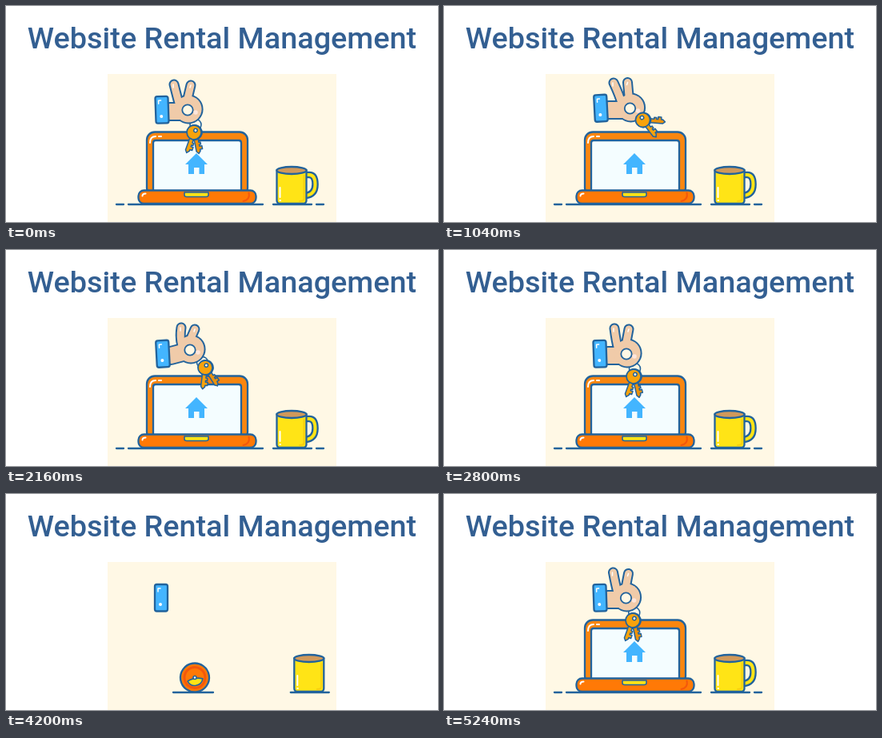
An HTML page that plays this animation: 540 px wide and 270 px high, repeating every 5.28 s.

```html
<!DOCTYPE html>
<html lang="en">
<head>
<meta charset="utf-8">
<title>Website Rental Management</title>
<style>
html, body { margin: 0; width: 100%; height: 100%; overflow: hidden; background: #fff; }
svg { display: block; width: 540px; height: 270px; }
text { font: 500 37.8px Roboto, "Open Sans", sans-serif; fill: #335f92; }
#scene { stroke: #22639c; stroke-width: 2.3; stroke-linecap: round; stroke-linejoin: round; fill: none; }
</style>
</head>
<body>
<svg viewBox="0 0 540 270">
  <defs>
    <clipPath id="panel"><rect x="127" y="85" width="286" height="185"/></clipPath>
    <filter id="rough" filterUnits="userSpaceOnUse" x="127" y="85" width="286" height="185" color-interpolation-filters="sRGB">
      <feTurbulence id="noise" type="fractalNoise" baseFrequency=".09" numOctaves="1" result="n"/>
      <feDisplacementMap in="SourceGraphic" in2="n" scale="1.4" xChannelSelector="R" yChannelSelector="G"/>
    </filter>
  </defs>
  <text x="270" y="53" text-anchor="middle">Website Rental Management</text>
  <rect x="127" y="85" width="286" height="185" fill="#fff8e5"/>
  <g clip-path="url(#panel)"><g filter="url(#rough)"><g id="scene"></g></g></g>
</svg>
<script>
const LOOP = 5280, STEP = 40, EXIT = 2800, ENTER = 3380;
const ORANGE = '#ff7906', AMBER = '#f9860f', YELLOW = '#ffe416', SKIN = '#f0cba9', BLUE = '#43b5ff', PAPER = '#fff8e5';
const scene = document.getElementById('scene'), noise = document.getElementById('noise');

const clamp = v => Math.min(1, Math.max(0, v));
const span = (t, a, b) => clamp((t - a) / (b - a));
const mix = (a, b, u) => a + (b - a) * u;
const smooth = u => u * u * (3 - 2 * u);
const easeOut = (u, p = 2) => 1 - (1 - u) ** p;
const back = u => 1 + 2.2 * (u - 1) ** 3 + 1.2 * (u - 1) ** 2;

// time, cuff x y tilt, two finger tips, thumb loop, key head, two blade angles
const POSES = [
  [0, 195, 130, -2, 210, 98, 231, 99, 227, 130, 235, 158, 20, -11],
  [600, 195, 130, -2, 220, 97, 238, 100, 231, 130, 238, 159, 18, -40],
  [1480, 197, 126, -4, 204, 95, 221, 91, 234, 126, 259, 126, -94, -130],
  [2160, 196, 130, -3, 219, 97, 236, 99, 230, 125, 249, 147, 7, -32],
  [2800, 195, 130, -2, 213, 98, 231, 99, 228, 130, 237, 158, 20, -13],
  [5200, 195, 130, -2, 213, 98, 230, 100, 228, 130, 237, 158, 20, -13],
  [5280, 195, 130, -2, 210, 98, 231, 99, 227, 130, 235, 158, 20, -11]
];

function poseAt(t) {
  const i = POSES.findIndex(p => p[0] > t), a = POSES[i - 1], b = POSES[i];
  const u = smooth(span(t, a[0], b[0]));
  return a.map((v, k) => mix(v, b[k], u)).slice(1);
}

const path = (d, attrs = '') => `<path d="${d}" ${attrs}/>`;
const fill = c => `fill="${c}"`;
const flat = c => `fill="${c}" stroke="none"`;
const shine = (d, w = 2) => path(d, `stroke="#fff" stroke-width="${w}"`);
const box = (x, y, w, h, r, attrs) => `<rect x="${x}" y="${y}" width="${w}" height="${h}" rx="${r}" ${attrs}/>`;
const circle = (x, y, r, attrs) => `<circle cx="${x}" cy="${y}" r="${r}" ${attrs}/>`;
const group = (transform, body) => `<g transform="${transform}">${body}</g>`;
const scaled = (x, y, sx, sy, body) =>
  sx > 0 && sy > 0 ? group(`translate(${x} ${y}) scale(${sx} ${sy}) translate(${-x} ${-y})`, body) : '';

const ground = (a, b) => b - a > 1 ? path(`M${a} 248H${b}`) : '';

function laptopLid() {
  return box(176, 157.5, 126, 80, 10, fill(AMBER)) +
    path('M184 232V171Q184 168 187 168H291Q294 168 294 171V232Z', fill('#f4fdff')) +
    shine('M180 171Q180 163 187 163M191 163H194');
}

function laptopBase(u) {
  const half = mix(18, 73.5, u), top = mix(212, 230.5, u), h = 247 - top, r = mix(18, 7, clamp(u));
  const pad = mix(8, 15, u);
  return box(239 - half, top, half * 2, h, r, fill(ORANGE)) +
    path(`M${239 + half - 9} ${top + 3}Q${239 + half - 7} ${top + h - 5} ${239 + half - 16} ${top + h - 3}`,
      'stroke="#f4580c" stroke-width="2"') +
    path(`M${238 - pad} ${top + 2.5}H${238 + pad}V${top + 6}Q${238 + pad} ${top + 8} ${235 + pad} ${top + 8}H${241 - pad}Q${238 - pad} ${top + 8} ${238 - pad} ${top + 6}Z`,
      fill(YELLOW) + ' stroke-width="1.6"') +
    shine(`M${239 - half + 5} ${top + 7}Q${239 - half + 5} ${top + 4} ${239 - half + 9} ${top + 4}`);
}

function ball(x) {
  const turn = (x - 239) / 18 * 180 / Math.PI;
  return group(`translate(${x} 229.5) rotate(${turn})`,
    circle(0, 0, 18, fill(ORANGE)) +
    circle(0, 0, 13, 'stroke="#f4580c" stroke-width="3"') +
    path('M-9.5 3Q0 -1 9.5 3A10 10 0 0 1 -9.5 3Z', fill(YELLOW) + ' stroke-width="1.6"') +
    circle(0, 0, 2, fill('#fff') + ' stroke-width="1.6"'));
}

const house = () => path('M238 184L252 198H248V210H241.5V202H235V210H228V198H224Z', flat(BLUE));

function mug(handle) {
  const ring = 'M374 211H379Q386.5 211 386.5 223Q386.5 236 374 237';
  const grip = path(ring, 'stroke-width="8.6"') + path(ring, `stroke="${YELLOW}" stroke-width="4"`);
  return scaled(374, 224, handle, handle, grip) +
    path('M338.5 205V243Q338.5 247 343 247H371Q375.5 247 375.5 243V205Z', fill(YELLOW)) +
    path('M372.5 212V241Q372 244 367 244', 'stroke="#f8cf0f" stroke-width="2"') +
    `<ellipse cx="357" cy="205.5" rx="18.5" ry="4.5" fill="#d1995a"/>` +
    shine('M342.5 227V239M342.5 243H343');
}

function cuff(x, y, tilt) {
  return group(`translate(${x} ${y}) rotate(${tilt})`,
    box(-8, -17, 16, 33.5, 2.5, fill(BLUE)) +
    shine('M-4 -8V-12H-1', 1.5) + circle(-1, 8, 2, flat('#fff')));
}

function hand([cx, cy, , ax, ay, bx, by, hx, hy]) {
  const px = hx + 1, py = hy - 1;
  const limbs = [
    [`M${cx + 10} ${cy + 2}L${px - 6} ${py + 3}`, 20],
    [`M${px} ${py}h.1`, 33],
    [`M${px - 11} ${py - 4}Q${px - 14} ${py - 15} ${ax} ${ay}`, 9],
    [`M${px - 2} ${py - 9}L${bx} ${by}`, 9]
  ];
  const layer = (color, extra) =>
    limbs.map(([d, w]) => path(d, `stroke="${color}" stroke-width="${w + extra}"`)).join('');
  return layer('#22639c', 4) + layer(SKIN, 0) +
    circle(hx, hy, 6.7, fill(PAPER) + ' stroke-width="1.8"') +
    circle(hx + 10, hy + 3, 2.8, flat('#fde6dc')) +
    shine(`M${ax - 1} ${ay}v4M${bx} ${by}l-1 3`, 1.5);
}

function keyBlade(x, y, angle, color) {
  return group(`translate(${x} ${y}) rotate(${angle})`,
    path('M-2.5 6V24L0 27L2.5 24V22H5.5V18H2.5V16H4.5V13H2.5V6Z', fill(color) + ' stroke-width="1.5"') +
    circle(0, 0, 9, fill(color) + ' stroke-width="1.8"') +
    circle(1, -3, 2.2, fill(PAPER) + ' stroke-width="1.5"'));
}

function keys(p) {
  const [kx, ky, a, b] = p.slice(9);
  return keyBlade(kx + 1, ky, b, '#eb920c') + keyBlade(kx, ky, a, '#f8a30c');
}

function keyRing(p) {
  const [hx, hy, kx, ky] = p.slice(7);
  return circle((hx + 12 + kx) / 2, (hy + 9 + ky) / 2, 7, 'stroke-width="1.6"');
}

function desk(t) {
  const p = poseAt(t);
  const shift = t > EXIT ? 284 * ((t - EXIT) / 520) ** 2 : 0;
  return group(`translate(${shift} 0)`,
    ground(138, 147) + ground(153, 321) + ground(334, 382) + ground(388, 397) +
    laptopLid() + laptopBase(1) + house() + mug(1) +
    keyRing(p) + hand(p) + cuff(...p) + keys(p));
}

function arrival(t) {
  const p = poseAt(t);
  const x = Math.min(239, 236 + (t - 4200) * .182);
  const spread = back(span(t, 4500, 4740));
  const lid = back(span(t, 4700, 4960));
  const grow = t <= 4500 ? 0 : spread;
  const pop = span(t, 5060, 5200);
  const reach = back(span(t, 4640, 5140));
  const hang = back(span(t, 4880, 5140));
  const icon = back(span(t, 4900, 5080));
  const mugShift = 80 * (1 - easeOut(span(t, 3960, 4480), 2.1));
  const cuffX = mix(110, 194, easeOut(span(t, 3400, 3960)));
  const settle = span(t, 4500, 4700);
  p[0] = mix(cuffX, p[0], settle);
  p[2] *= settle;

  let out = ground(mix(x - 27, 153, grow), mix(x + 23, 321, grow));
  out += ground(mix(147, 138, span(t, 4740, 4840)), 147);
  out += group(`translate(${mugShift} 0)`, ground(334, 382) + mug(back(pop)));
  out += ground(388, mix(388, 397, pop));
  if (t > 4700) out += scaled(239, 236, 1, lid, laptopLid());
  out += t <= 4500 ? ball(x) : laptopBase(spread);
  if (t > 4900) out += scaled(238, 198, icon, icon, house());
  if (t > 4880) out += scaled(237, 140, hang, hang, keyRing(p));
  if (t > 4640) out += scaled(203, 132, reach, reach, hand(p));
  out += cuff(...p);
  if (t > 4880) out += scaled(237, 140, hang, hang, keys(p));
  return out;
}

const start = performance.now();
function frame(now) {
  const t = Math.floor((Math.max(0, now - start) % LOOP) / STEP) * STEP;
  noise.setAttribute('seed', 1 + Math.floor(t / 120) % 6);
  scene.innerHTML = t < ENTER ? desk(t) : arrival(t);
  requestAnimationFrame(frame);
}
frame(start);
</script>
</body>
</html>
```
